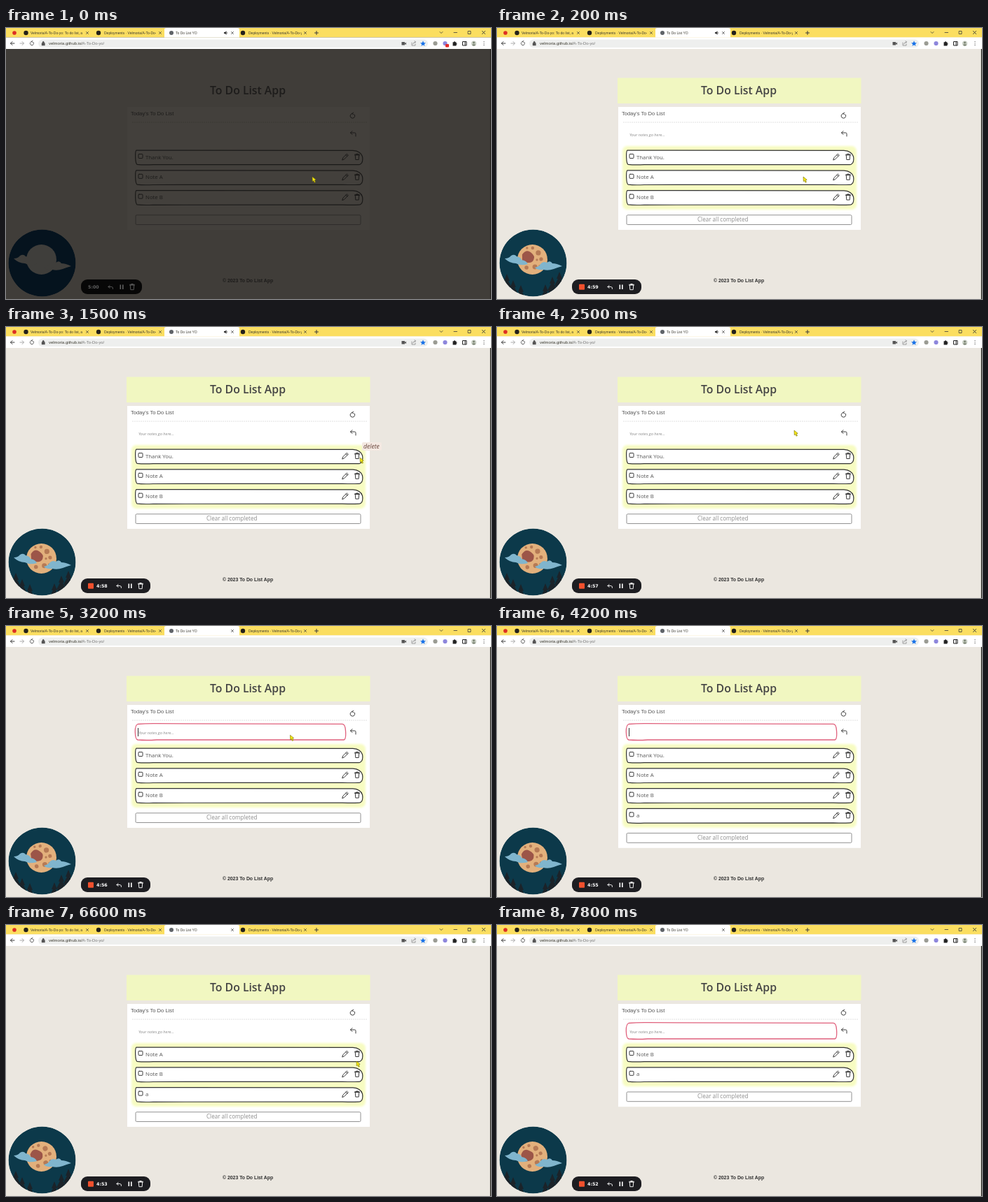
An HTML page that plays this animation: 692 by 388 pixels, repeating every 8 s.

```html
<!DOCTYPE html>
<html lang="en">
<head>
<meta charset="utf-8">
<title>To Do List App</title>
<style>
html, body { margin: 0; width: 692px; height: 388px; overflow: hidden; background: #ebe7e0; }
svg { display: block; }
text { font-family: "Open Sans", "Noto Sans", sans-serif; fill: #555; }
.ui { font-family: "Liberation Sans", Arial, sans-serif; }
.line { fill: none; stroke: var(--ink, #3a3a3a); stroke-width: 1; stroke-linecap: round; stroke-linejoin: round; }
.box { fill: #fff; stroke: #333; stroke-width: 1.2; }
#chrome { --ink: #3a3a3a; }
#chrome text { font-size: 5px; fill: #3c3a30; }
#page { fill: #ebe7e0; }
#band { fill: #f1f7c1; }
#panel { fill: #fff; }
#glow { fill: #f7fcc2; filter: url(#soft); }
#rule { stroke: #d9d9d9; stroke-width: .8; stroke-dasharray: 2 1; }
#clear rect { fill: #fff; stroke: #858585; stroke-width: .9; }
#clear text { fill: #8d8d8d; font-size: 8.1px; }
#hint { font-size: 5.7px; font-style: italic; fill: #8a8a8a; }
#title { font-size: 15.8px; font-weight: 600; fill: #444; }
#foot { font-size: 6.87px; font-weight: bold; fill: #2e2e2e; }
#bar { --ink: #eee; }

.dark { --ink: #1a1918; }
.dark #page { fill: #403d39; }
.dark #band { fill: none; }
.dark #panel { fill: #43403c; }
.dark #glow, .dark #hint, .dark #clear text, .dark #trees, .dark #spots { display: none; }
.dark .box, .dark #clear rect { fill: none; stroke: #1a1918; }
.dark #clear rect { stroke-width: .5; }
.dark #rule { stroke: #383532; }
.dark #app text, .dark #foot { fill: #1d1c1b; }
.dark #sky { fill: #05131e; }
.dark #disc, .dark #clouds { fill: #3f3e3b; }
.dark #pill { fill: #070707; width: 87px; }
.dark #rec { display: none; }
.dark #bar { opacity: .35; transform: translateX(-12px); }
</style>
</head>
<body>
<svg id="stage" width="692" height="388" viewBox="0 0 692 388" xmlns="http://www.w3.org/2000/svg">
  <defs>
    <filter id="soft" x="-5%" y="-10%" width="110%" height="120%"><feGaussianBlur stdDeviation="1.6"/></filter>
    <clipPath id="lens"><circle cx="51.5" cy="336.5" r="48"/></clipPath>
    <path id="x" d="M-1.6-1.6 1.6 1.6M1.6-1.6-1.6 1.6" class="line" style="stroke-width:.7"/>
    <path id="pencil" class="line" d="M-4.2 4.2-3.2 1.2 2.4-4.2 4.3-2.4-1.2 3.2ZM1-2.8 2.9-1"/>
    <path id="bin" class="line" d="M-3.4-2.6H3.4M-3.2-3.4H3.2M-1.2-3.4V-4.2H1.2V-3.4M-2.7-2.2-2.2 4H2.2L2.7-2.2"/>
    <path id="turn" class="line" d="M2.6-2A3.3 3.3 0 1 1-.5-3.3M-.5-3.300 1.300-4.700M-.5-3.300 1.200-1.900"/>
  </defs>

  <rect id="page" width="692" height="388"/>

  <g id="chrome" class="ui">
    <rect width="692" height="13.5" fill="#fbde60"/>
    <rect y="13.5" width="692" height="16.5" fill="#fff"/>
    <path d="M226 13.500V2Q226 0 229 0H330Q333 0 333 2V13.500Z" fill="#fff"/>
    <circle cx="12" cy="7" r="2.8" fill="#dd2f24"/>
    <g id="tabs"></g>
    <circle cx="236" cy="7" r="3" fill="#5f6368"/>
    <path id="sound" d="M311 6H312.5L314.5 4.3V9.7L312.5 8H311ZM315.5 5.5Q317 7 315.5 8.5" fill="#333"/>
    <path class="line" d="M440.5 7H445.5M443 4.5V9.5"/>
    <path class="line" style="stroke-width:.8" d="M619 5.500 621 7.500 623 5.500M639 6.500H643.500M659.500 4.500H663V8.500H659.500Z"/>
    <use href="#x" transform="translate(681.5 6.5) scale(1.3)"/>
    <path class="line" d="M12 22H6.5M9 19.5 6.5 22 9 24.5"/>
    <path class="line" d="M20 22H25.5M23 19.5 25.5 22 23 24.5" style="stroke:#aaa"/>
    <use href="#turn" transform="translate(37 22) scale(.8)"/>
    <rect x="46" y="16.5" width="556" height="11.5" rx="5.7" fill="#eeefee"/>
    <path d="M51 21.5H55.4V25H51ZM52 21.5V20Q53.2 18.2 54.4 20V21.5" fill="#555" stroke="#555" stroke-width=".4"/>
    <text x="61" y="24.3" class="ui" style="font-size:5.9px">velmoria.github.io/<tspan fill="#777">A-To-Do-yo/</tspan></text>
    <path d="M564.5 20H569V24.5H564.5ZM569 22 571 20.5V24L569 22.8Z" fill="#555"/>
    <path class="line" style="stroke:#888;stroke-width:.8" d="M579 21V25H584V23M580.5 23Q581 20 584.5 20M583 18.5 584.5 20 583 21.5"/>
    <path d="M595 18.3 596.1 21 599 21.2 596.8 23 597.5 25.8 595 24.3 592.5 25.8 593.2 23 591 21.2 593.9 21Z" fill="#1a73e8"/>
    <circle cx="612.5" cy="22" r="3.1" fill="#9b9c94"/>
    <circle cx="626.5" cy="22" r="3.1" fill="#8d86dc"/>
    <rect id="badge" x="627" y="23" width="5" height="4.5" rx="1" fill="#e32b2b"/>
    <path d="M637.5 20.3H639Q640 17.6 641 20.3H642.5V22Q645 22.8 642.5 23.8V25.5H637.5Z" fill="#222"/>
    <path d="M651.5 19.5H657V25H651.5ZM655 19.5V25" fill="none" stroke="#222"/>
    <circle cx="667.5" cy="22" r="3.6" fill="#c9cfc4"/>
    <path d="M664.8 24.5Q667.5 21.8 670.2 24.5Q667.5 26.8 664.8 24.5Z" fill="#77806f"/>
    <circle cx="667.5" cy="21" r="1.4" fill="#77806f"/>
    <path d="M682 19.6V24.6" stroke="#444" stroke-width="1.2" stroke-linecap="round" stroke-dasharray="0 2.4"/>
  </g>

  <g id="app">
    <rect id="band" x="172" y="71.5" width="347.5" height="36.5"/>
    <text id="title" x="345" y="94.6" text-anchor="middle">To Do List App</text>
    <rect id="panel" x="173" y="113" width="346" height="176"/>
    <text class="ui" x="178" y="124.8" font-size="7.6">Today's To Do List</text>
    <use href="#turn" x="494.5" y="125.8"/>
    <path id="rule" d="M180 135H515"/>
    <path id="field" fill="#fff" stroke="#e0607c" stroke-width="1.3" d="M188 140.500Q200 139.500 215 139.700L480 140.300Q484 140.500 484.500 150Q485.500 162.500 482 163H215Q200 164 188 163Q184.500 162.500 184.300 152Q184 142 188 140.500Z"/>
    <text id="hint" x="189" y="154.8">Your notes go here...</text>
    <text id="typed" x="189" y="155" font-size="7.8">a</text>
    <path id="caret" d="M0 146V158" stroke="#333"/>
    <path class="line" d="M494 147.500 491.500 150 494 152.500M491.500 150H497.500Q499 150 499 151.500V155"/>
    <rect id="glow" x="179" y="169" width="334" height="91" rx="7"/>
    <g id="rows"></g>
    <g id="clear">
      <rect x="185" y="267.8" width="321" height="13.7" rx="1.5"/>
      <text x="286" y="277.3">Clear all completed</text>
    </g>
  </g>
  <text id="foot" class="ui" x="309" y="363.8">© 2023 To Do List App</text>

  <g clip-path="url(#lens)">
    <circle id="sky" cx="51.5" cy="336.5" r="48" fill="#0c394a"/>
    <g id="trees" fill="#1b2329"></g>
    <circle id="disc" cx="50.5" cy="331.5" r="21.5" fill="#e2b07c"/>
    <g id="spots" fill="#b67a55">
      <path d="M36 324Q42 316 48 321T53 329Q52 336 46 336T36 333Z" fill="#9c5548"/>
      <circle cx="59" cy="322" r="3.6"/><circle cx="63" cy="331" r="2.6"/>
      <circle cx="54" cy="342" r="3.5"/><circle cx="42" cy="343" r="2.8"/>
      <circle cx="51" cy="315" r="2.2"/><circle cx="61" cy="341" r="1.8"/>
      <circle cx="43" cy="315" r="1.7"/><circle cx="57" cy="332" r="1.6"/>
    </g>
    <g id="clouds" fill="#80b5cd">
      <path d="M11 330Q17 330 20 326Q25 323 28 327Q34 328 35 332Q42 333 44 338Q34 341 27 337Q18 337 11 330Z"/>
      <path d="M54 343Q60 342 62 338Q66 333 71 336Q76 332 79 337Q85 337 93 341Q86 343 81 345Q73 348 66 346Q58 347 54 343Z"/>
    </g>
  </g>

  <rect id="pill" x="107" y="360" width="99" height="21" rx="9" fill="#1d1d21"/>
  <g id="bar">
    <rect id="rec" x="117" y="366.7" width="8" height="8" rx="1" fill="#f2502d"/>
    <text id="clock" x="129" y="373" style="font:bold 6.3px 'DejaVu Sans',sans-serif;fill:#fff"></text>
    <path class="line" d="M160 368.5 158 370.5 160 372.5M158 370.5H162.5Q165 370.5 164.5 373.5"/>
    <path d="M175.3 367.5V374M178.8 367.5V374" stroke="#fff" stroke-width="1.6"/>
    <use href="#bin" x="192" y="370.7"/>
  </g>

  <g id="tip">
    <rect x="508" y="165" width="28" height="12" rx="2" fill="#f4e9e2"/>
    <text x="510" y="173.7" font-size="8.7" font-style="italic" style="fill:#69443a">delete</text>
  </g>
  <path id="mouse" d="M0 0 5.2 4.3 3.3 4.9 4.5 7.6 2.9 8.2 1.9 5.5 .3 6.8Z" fill="#f8ea12" stroke="#6f6808" stroke-width=".6"/>
  <path d="M691.4 30V388" stroke="#25231f" stroke-width="1.2"/>
</svg>
<script>
const LOOP = 8000, STEP = 100, PITCH = 28.8;
const $ = id => document.getElementById(id);
const show = (id, on) => $(id).style.display = on ? '' : 'none';
const within = (t, spans) => spans.some(([a, b]) => t >= a && t < b);

const notes = ['Thank You.', 'Note A', 'Note B', 'a'];
const path = [
  [0, 437, 213], [600, 437, 213], [1500, 505, 187], [1900, 504, 186],
  [2500, 424, 148], [2900, 405, 156], [5200, 415, 160], [5500, 545, 176],
  [5700, 504, 184], [6000, 504, 184], [6600, 500, 195], [6800, 502, 188],
  [7500, 503, 188], [7700, 430, 152], [8000, 430, 152]
];
const hovers = [[1400, 2000], [5600, 5900], [6800, 7500]];
const hidden = [[3600, 5200], [7800, 8000]];
const focus = [[2900, 5900], [7700, 8000]];
const caretOn = [[2900, 3900], [4100, 5000], [5500, 5900]];

// Tabs: mark x, text x, text width, close x, label
$('tabs').innerHTML = [
  [28.5, 35, 77, 116, 'Velmoria/A-To-Do-yo: To do list, a'],
  [132, 140, 74, 220, 'Deployments · Velmoria/A-To-Do-yo'],
  [0, 242, 60, 323, 'To Do List YO'],
  [338, 346, 76, 427, 'Deployments · Velmoria/A-To-Do-yo']
].map(([mark, x, w, close, label]) =>
  (mark ? `<circle cx="${mark}" cy="7" r="3.2" fill="#24211a"/>` : '') +
  `<svg x="${x}" y="0" width="${w}" height="14"><text class="ui" y="9">${label}</text></svg>` +
  `<use href="#x" x="${close}" y="7"/>`).join('');

$('trees').innerHTML = [[14, 352], [23, 361], [34, 368], [69, 367], [79, 356], [89, 349]]
  .map(([x, y]) => `<path d="M${x} ${y}l4 10h-2l5 10h-2l4 18h-18l4-18h-2l5-10h-2z"/>`).join('');

$('rows').innerHTML = notes.map(note => `<g>
  <path class="box" d="M186 175L495 175.300Q506 176 508.500 184Q510 193 505 195.300Q500 196 480 195.500L210 195.700Q195 196.300 187 195.300Q185 194 184.700 186Q184.300 176 186 175Z"/>
  <rect class="line" x="189" y="180.5" width="6" height="6" rx="1"/>
  <text x="199" y="187.6" font-size="7.8">${note}</text>
  <use href="#pencil" x="484" y="184.5"/><use href="#bin" x="501" y="184.5"/></g>`).join('');
const rows = [...$('rows').children];

function mouseAt(t) {
  const i = path.findIndex(p => p[0] > t);
  const [a, x, y] = path[i - 1], [b, u, v] = path[i];
  const k = (t - a) / (b - a), e = k * k * (3 - 2 * k);
  return [x + (u - x) * e, y + (v - y) * e];
}

function draw(t) {
  const first = t >= 7500 ? 2 : t >= 5900 ? 1 : 0;
  const end = t >= 4200 ? 4 : 3;
  const grow = (end - first - 3) * PITCH;
  const typing = t >= 3600 && t < 4200;

  $('stage').classList.toggle('dark', t < 100);
  show('badge', t < 100);
  show('sound', t < 3000);

  rows.forEach((row, i) => {
    row.style.display = i >= first && i < end ? '' : 'none';
    row.setAttribute('transform', `translate(0 ${(i - first) * PITCH})`);
  });
  $('panel').setAttribute('height', 176 + grow);
  $('glow').setAttribute('height', 91 + grow);
  $('clear').setAttribute('transform', `translate(0 ${grow})`);

  show('field', within(t, focus));
  show('typed', typing);
  show('hint', !within(t, [[3600, 4300]]));
  show('caret', within(t, caretOn));
  $('caret').setAttribute('transform', `translate(${typing ? 194.5 : 188.5} 0)`);

  show('tip', within(t, hovers));
  show('mouse', !within(t, hidden));
  $('mouse').setAttribute('transform', `translate(${mouseAt(t)})`);

  const left = t < 100 ? 300 : 299 - Math.max(0, Math.floor((t - 200) / 1000));
  $('clock').textContent = Math.floor(left / 60) + ':' + String(left % 60).padStart(2, '0');
  $('spots').setAttribute('transform', `rotate(${-t / 400} 50.5 331.5)`);
}

const start = performance.now();
function tick() {
  const t = (performance.now() - start) % LOOP;
  draw(Math.floor(t / STEP) * STEP);
  requestAnimationFrame(tick);
}
tick();
</script>
</body>
</html>
```
